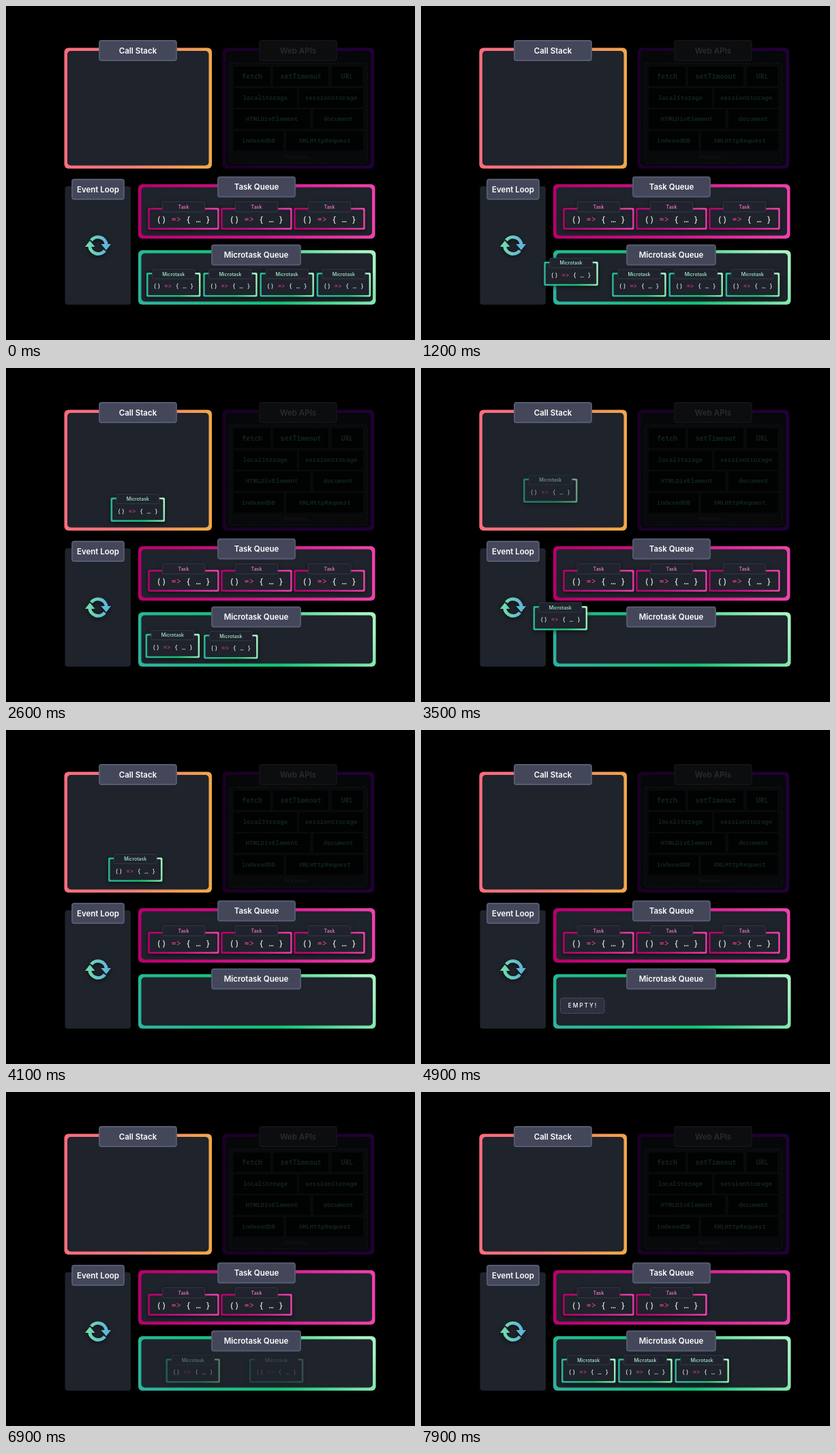
These frames come from a looping animation (600x491 px, 8 s). An HTML page:

```html
<!DOCTYPE html>
<html>
<head>
<meta charset="utf-8">
<style>
html, body { margin: 0; width: 100%; height: 100%; overflow: hidden; background: #000; }
svg { display: block; width: 600px; height: 491px; }
text { font-family: Inter, sans-serif; font-weight: 500; text-anchor: middle; fill: #fff; }
.code { font-family: "Noto Sans Mono", "DejaVu Sans Mono", monospace; }
.api { font-weight: 600; fill: #10241f; }
.card { filter: drop-shadow(0 2px 3px #0008); }
</style>
</head>
<body>
<svg id="stage" viewBox="0 0 600 491"></svg>
<script>
const LOOP = 8000, TRAVEL = 850, FADE = 240;
const PANEL = '#1f232b';

const rect = (x, y, w, h, r, fill, extra = '') =>
  `<rect x="${x}" y="${y}" width="${w}" height="${h}" rx="${r}" fill="${fill}" ${extra}/>`;
const label = (x, y, size, str, extra = '') =>
  `<text x="${x}" y="${y + size * 0.36}" font-size="${size}" ${extra}>${str}</text>`;
const gradient = (id, colors, dir = '') =>
  `<linearGradient id="${id}" ${dir}>${colors.map((c, i) =>
    `<stop offset="${i / (colors.length - 1)}" stop-color="${c}"/>`).join('')}</linearGradient>`;
const frame = (x, y, w, h, paint, fill = PANEL) =>
  rect(x, y, w, h, 6, `url(#${paint})`) + rect(x + 4.5, y + 4.5, w - 9, h - 9, 5, fill);
const title = (x, y, w, h, str) =>
  rect(x, y, w, h, 3, '#434759', 'stroke="#575c73" stroke-width="1.8"') +
  label(x + w / 2, y + h / 2, 11.5, str, 'style="font-weight:600"');

function webApis() {
  const rows = [
    [89, 10, [334, 388, 'fetch'], [392, 473, 'setTimeout'], [478, 523, 'URL']],
    [121, 9.1, [334, 427, 'localStorage'], [430, 524, 'sessionStorage']],
    [152, 9.1, [334, 446, 'HTMLDivElement'], [451, 524, 'document']],
    [184, 9.1, [334, 407, 'indexedDB'], [411, 524, 'XMLHttpRequest']]
  ];
  return frame(317.5, 61.5, 222.5, 177.5, 'purple', '#060709') +
    rect(328, 84, 202, 147, 3, '#08090b', 'stroke="#15171a" stroke-dasharray="3 2"') +
    rows.map(([y, size, ...cells]) => cells.map(([a, b, str]) =>
      rect(a, y, b - a, 28.5, 1, '#010202') +
      label((a + b) / 2, y + 14.2, size, str, 'class="code api"')).join('')).join('') +
    label(427, 221, 7, 'And more...', 'style="fill:#15171a"') +
    rect(372, 51, 113, 29, 3, '#0c0d0f', 'stroke="#121316" stroke-width="1.8"') +
    label(428.5, 65.5, 11.5, 'Web APIs', 'style="font-weight:600;fill:#2b2b2d"');
}

function loopIcon() {
  const half = `<path d="M-10 -7.5A12.5 12.5 0 0 1 12.3 -1" fill="none" stroke="url(#icon)" stroke-width="5"/>
    <path d="M4.5 -2H19L12 7Z" fill="url(#icon)"/>`;
  const back = half.replaceAll('#icon', '#iconBack');
  return `<g transform="translate(135 352)" class="card">${half}<g transform="rotate(180)">${back}</g></g>`;
}

const card = kind => {
  const { w, h, tagY, tagH, size, codeY, name, color } = kind;
  return `<g class="card">` + rect(0, 0, w, h, 2, `url(#${kind.paint})`) +
    rect(2.5, 2.5, w - 5, h - 5, 1.5, PANEL) +
    rect(w / 2 - 31.2, tagY, 62.5, tagH, 1.5, '#20232d', 'stroke="#343848"') +
    label(w / 2, tagY + tagH / 2, 7, name, `style="fill:${color}"`) +
    label(w / 2, codeY, size, '() <tspan fill="#f0409a">=&gt;</tspan> { … }', 'class="code"') + '</g>';
};

// Each path lists offsets from the first slot: two handles and the end.
const micro = {
  w: 79.5, h: 35.5, tagY: -5, tagH: 14, size: 9, codeY: 20, name: 'Microtask', color: '#a8f0cc', paint: 'green',
  x: 206, y: 392, pitch: 83.2, path: [[-100, -40], [4, -183], [-56, -203]]
};
const task = {
  w: 104.5, h: 32, tagY: -9, tagH: 15, size: 12, codeY: 17, name: 'Task', color: '#f080c4', paint: 'pink',
  x: 208.2, y: 296.7, pitch: 107, path: [[-120, 10], [-30, -40], [-71, -107]]
};
const microStarts = [1020, 1830, 2545, 3228], taskStarts = [5488];

const many = (kind, n) => card(kind).repeat(n);
const stage = document.getElementById('stage');
stage.innerHTML = '<defs>' +
  gradient('warm', ['#ff6b7d', '#f0787a', '#f2a848'], 'x2="1" y2="0.1"') +
  gradient('purple', ['#1b0026', '#22003a']) +
  gradient('pink', ['#b8006c', '#d0148a', '#ee42ac']) +
  gradient('green', ['#2bb49c', '#10c474', '#a6f2c2'], 'y1="0.6" y2="0.4"') +
  gradient('icon', ['#72e2a6', '#5aaee2'], 'gradientUnits="userSpaceOnUse" x1="-19" x2="19"') +
  gradient('iconBack', ['#5aaee2', '#72e2a6'], 'gradientUnits="userSpaceOnUse" x1="-19" x2="19"') +
  '</defs>' +
  frame(85.5, 61.5, 216.5, 177.5, 'warm') + title(137, 51, 113, 29, 'Call Stack') +
  webApis() +
  rect(86.5, 265, 96.5, 174, 4, PANEL) + title(97, 255, 76, 29, 'Event Loop') + loopIcon() +
  frame(194, 262, 347.5, 80, 'pink') + title(311, 251.5, 113, 29, 'Task Queue') +
  frame(194, 359, 348.5, 80, 'green') + title(302, 351.5, 130, 29, 'Microtask Queue') +
  '<g id="empty">' +
  rect(204.5, 394, 64.5, 22.5, 3, '#2d303e', 'stroke="#5d6279" stroke-dasharray="2 1.5"') +
  label(237.4, 405.2, 8.5, 'EMPTY!', 'letter-spacing="1.8"') + '</g>' +
  `<g id="micros">${many(micro, 4)}</g><g id="tasks">${many(task, 3)}</g><g id="fresh">${many(micro, 3)}</g>`;

const [empty, micros, tasks, fresh] = ['empty', 'micros', 'tasks', 'fresh'].map(id => document.getElementById(id));
const clamp = v => Math.max(0, Math.min(1, v));
const ease = v => (1 - Math.cos(Math.PI * clamp(v))) / 2;

function along(path, t) {
  const s = 1 - t, k = [3 * s * s * t, 3 * s * t * t, t * t * t];
  return [0, 1].map(a => path.reduce((sum, p, i) => sum + k[i] * p[a], 0));
}

function place(el, x, y, opacity) {
  el.setAttribute('transform', `translate(${x.toFixed(2)} ${y.toFixed(2)})`);
  el.setAttribute('opacity', opacity);
}

function drawQueue(group, kind, starts, time) {
  const gone = starts.map(s => ease((time - s) / TRAVEL));
  [...group.children].forEach((el, i) => {
    const slot = i - gone.slice(0, i).reduce((a, b) => a + b, 0);
    const [dx, dy] = along(kind.path, gone[i] || 0);
    const out = i < starts.length ? ease((time - starts[i] - TRAVEL) / FADE) : 0;
    place(el, kind.x + slot * kind.pitch + dx, kind.y + dy - 65 * out, 1 - out);
  });
}

function draw(now) {
  const time = now % LOOP;
  drawQueue(micros, micro, microStarts, time);
  drawQueue(tasks, task, taskStarts, time);
  [...fresh.children].forEach((el, i) => {
    const p = clamp((time - 6700 - 100 * i) / 500), rest = (1 - p) ** 3;
    place(el, micro.x + i * micro.pitch + 133 * rest, micro.y, p);
  });
  empty.setAttribute('opacity', ease((time - 4350) / 250) * (1 - ease((time - 5250) / 250)));
  requestAnimationFrame(draw);
}
requestAnimationFrame(draw);
</script>
</body>
</html>
```
